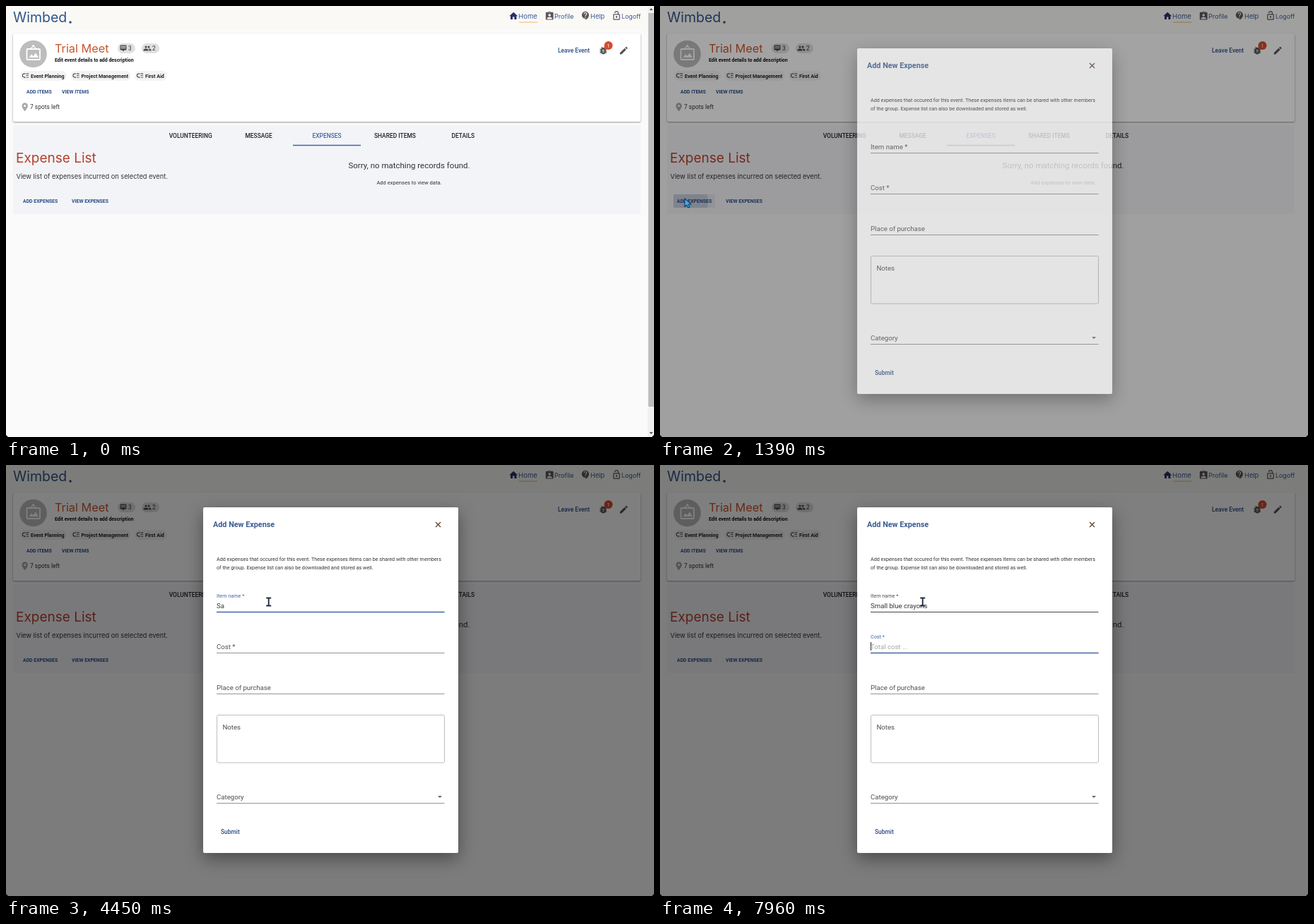
These frames come from a looping animation (917x611 px, 8000 ms). An HTML page:

```html
<!DOCTYPE html>
<html lang="en">
<head>
<meta charset="utf-8">
<title>Expense form</title>
<style>
  html, body { margin: 0; width: 100%; height: 100%; overflow: hidden; background: #fafafa; }
  svg { display: block; width: 917px; height: 611px; font-family: Roboto, Arial, sans-serif; }
  .geo { font-family: Inter, sans-serif; }
</style>
</head>
<body>
<svg id="stage" viewBox="0 0 917 611"></svg>
<script>
const LOOP = 8000;
const NAVY = '#2b4c86', BLUE = '#4464a6', INK = '#333', RED = '#b5402c';

// Markup helpers
const text = (x, y, size, str, fill = INK, weight = 400, extra = '') =>
  `<text x="${x}" y="${y}" font-size="${size}" fill="${fill}" font-weight="${weight}" ${extra}>${str}</text>`;
const geo = (x, y, size, str, fill) => text(x, y, size, str, fill, 400, 'class="geo"');
const mid = (x, y, size, str, fill, weight) => text(x, y, size, str, fill, weight, 'text-anchor="middle"');
const rect = (x, y, w, h, fill, r = 0, extra = '') =>
  `<rect x="${x}" y="${y}" width="${w}" height="${h}" rx="${r}" fill="${fill}" ${extra}/>`;
const icon = (name, x, y, scale, fill) =>
  `<path transform="translate(${x} ${y}) scale(${scale})" fill="${fill}" fill-rule="evenodd" d="${icons[name]}"/>`;
const line = (x1, x2, y, stroke, width = 1, extra = '') =>
  `<path d="M${x1} ${y}H${x2}" stroke="${stroke}" stroke-width="${width}" ${extra}/>`;

const icons = {
  home: 'M10 20v-6h4v6h5v-8h3L12 3 2 12h3v8z',
  profile: 'M19 3h-4.2a3 3 0 0 0-5.6 0H5a2 2 0 0 0-2 2v14a2 2 0 0 0 2 2h14a2 2 0 0 0 2-2V5a2 2 0 0 0-2-2zm-7 0a1 1 0 0 1 0 2 1 1 0 0 1 0-2zm0 4a3 3 0 0 1 0 6 3 3 0 0 1 0-6zm6 12H6v-1.4c0-2 4-3.1 6-3.1s6 1.1 6 3.1z',
  help: 'M11.5 2a8.5 8.5 0 0 0 0 17h.5v3c4.9-2.3 8-7 8-11.5A8.5 8.5 0 0 0 11.5 2zm1 14.5h-2v-2h2zm0-3.5h-2c0-3.2 3-3 3-5a2 2 0 0 0-4 0h-2a4 4 0 0 1 8 0c0 2.5-3 2.8-3 5z',
  lock: 'M12 17a2 2 0 0 0 0-4 2 2 0 0 0 0 4zm6-9h-1V6A5 5 0 0 0 7 6h1.9a3.1 3.1 0 0 1 6.2 0v2H6a2 2 0 0 0-2 2v10a2 2 0 0 0 2 2h12a2 2 0 0 0 2-2V10a2 2 0 0 0-2-2zm0 12H6V10h12z',
  edit: 'M3 17.2V21h3.8L17.8 9.9l-3.7-3.7zM20.7 7a1 1 0 0 0 0-1.4l-2.3-2.3a1 1 0 0 0-1.4 0l-1.9 1.8 3.8 3.8z',
  bug: 'M20 8h-2.8a6 6 0 0 0-1.8-2L17 4.4 15.6 3l-2.2 2.2a6 6 0 0 0-2.8 0L8.4 3 7 4.4 8.6 6a6 6 0 0 0-1.8 2H4v2h2.1L6 11v1H4v2h2v1l.1 1H4v2h2.8a6 6 0 0 0 10.4 0H20v-2h-2.1l.1-1v-1h2v-2h-2v-1l-.1-1H20zm-6 8h-4v-2h4zm0-4h-4v-2h4z',
  people: 'M16 11a3 3 0 0 0 0-6 3 3 0 0 0 0 6zm-8 0a3 3 0 0 0 0-6 3 3 0 0 0 0 6zm0 2c-2.3 0-7 1.2-7 3.5V19h14v-2.5C15 14.2 10.300 13 8 13zm8 0h-1c1.200.8 2 2 2 3.500V19h6v-2.500C23 14.200 18.300 13 16 13z',
  board: 'M5 3h14a2 2 0 0 1 2 2v10a2 2 0 0 1-2 2h-4l-3 4-3-4H5a2 2 0 0 1-2-2V5a2 2 0 0 1 2-2zm0 3v2h14V6zm0 4v2h14v-2z',
  list: 'M14 5h8v2h-8zm0 5.500h8v2h-8zm0 5.500h8v2h-8zM2 11.500A6.500 6.500 0 0 0 8.500 18H9v2l3-3-3-3v2h-.5a4.500 4.500 0 0 1 0-9H12V5H8.500A6.500 6.500 0 0 0 2 11.500z',
  pin: 'M12 2a7 7 0 0 0-7 7c0 5.200 7 13 7 13s7-7.800 7-13a7 7 0 0 0-7-7zm0 9.500a2.500 2.500 0 0 1 0-5 2.500 2.500 0 0 1 0 5z'
};

const chip = (x, w, label) =>
  rect(x, 92, w, 14, '#f3f3f4', 7) + icon('list', x + 2, 93.3, .46, '#333') +
  text(x + 15, 102, 7.1, label, '#222', 700);
const pill = (x, name, n) =>
  rect(x, 53, 25, 14, '#e0e0e0', 7) + icon(name, x + 2, 54, .5, '#4a4a4a') + text(x + 15, 63, 8.4, n);
const nav = (x, size, label, name, ix, iy, fill) =>
  icon(name, ix, iy, .6, fill) + geo(x, 18, size, label, '#3b5a94');

const header =
  rect(0, 0, 917, 611, '#fafafa') + rect(0, 0, 917, 34, '#faf9f6') +
  geo(10, 23, 19.5, 'Wimbed', '#2f5488') + '<circle cx="91" cy="23" r="1.800" fill="#2f5488"/>' +
  nav(725, 9.6, 'Home', 'home', 711, 7, '#28306c') + line(726, 752, 23, '#f0b860') +
  nav(776, 9.1, 'Profile', 'profile', 762, 7, '#5d5558') +
  nav(827, 9.3, 'Help', 'help', 813, 6.500, '#5d5558') +
  nav(871, 8.9, 'Logoff', 'lock', 856.800, 6.500, '#5d5558');

const card =
  rect(10, 39, 888, 125, '#fff', 2, 'style="filter:drop-shadow(0 1px 1px #0006)"') +
  '<circle cx="38.500" cy="68" r="19.300" fill="#bdbdbd"/>' +
  '<g fill="none" stroke="#fff" stroke-width="1.800"><rect x="29.500" y="61" width="18.500" height="15" rx="1"/>' +
  '<path d="M34 61l4.700-4 4.700 4" stroke-width="1.200"/></g>' +
  '<circle cx="38.700" cy="56.500" r="1.500" fill="#fff"/><path d="M32.500 73l3.500-4.500 2.500 2.500 3.500-4.500 4 6.500z" fill="#fff"/>' +
  geo(69, 66, 16.300, 'Trial Meet', '#c8552f') + pill(158, 'board', 3) + pill(192, 'people', 2) +
  chip(20, 66, 'Event Planning') + chip(91.500, 85, 'Project Management') + chip(182, 46, 'First Aid') +
  text(29, 124, 6.900, 'ADD ITEMS', NAVY, 700) + text(79, 124, 6.900, 'VIEW ITEMS', NAVY, 700) +
  icon('pin', 19.500, 136, .6, '#a9a9a9') + text(34, 145.500, 8.430, '7 spots left');

const loaded =
  text(69, 79, 6.950, 'Edit event details to add description', '#111', 700) +
  text(781, 66, 8.430, 'Leave Event', NAVY, 500) +
  icon('bug', 838, 56, .6, '#555') + '<circle cx="852.500" cy="56" r="6" fill="#d8492c"/>' +
  mid(852.500, 58.600, 7.200, '1', '#fff') + icon('edit', 867, 56, .6, '#555');

const tabs = ['VOLUNTEERING', 'MESSAGE', 'EXPENSES', 'SHARED ITEMS', 'DETAILS']
  .map((s, i) => mid(261.200 + i * 96.400, 187, 8.430, s, i == 2 ? BLUE : '#222', 500)).join('');

const panel =
  rect(10, 169, 888, 126, '#f3f4f7') + tabs + line(406, 502, 197.500, BLUE, 1.300) +
  geo(14, 222, 19, 'Expense List', RED) +
  geo(14.500, 245, 9.250, 'View list of expenses incurred on selected event.', '#333') +
  mid(570.500, 229.500, 11.500, 'Sorry, no matching records found.') +
  mid(570.500, 253, 7.600, 'Add expenses to view data.') +
  rect(19, 267, 59, 19, '#28467f', 2, 'id="hover"') +
  '<clipPath id="button"><rect x="19" y="267" width="59" height="19" rx="2"/></clipPath>' +
  '<circle id="ripple" cx="36" cy="277" fill="#28467f" clip-path="url(#button)"/>' +
  text(24, 279, 6.900, 'ADD EXPENSES', NAVY, 700) + text(93, 279, 6.900, 'VIEW EXPENSES', NAVY, 700);

const scrollbar =
  rect(908, 0, 9, 611, '#f1f1f1') + rect(909, 10, 8, 558, '#bdbdbd') +
  '<path d="M910.500 6l2.500-3 2.500 3zM910.500 604l2.500 3 2.500-3z" fill="#555"/>';

// An input whose label shrinks upward while a blue line grows from the middle
const field = (id, y, label, hint) =>
  line(298, 620.500, y + 5.500, '#949494', 1, `id="${id}Base"`) +
  line(298, 620.500, y + 5.500, BLUE, 1.300, `id="${id}Line"`) +
  `<g id="${id}Label">${text(0, 0, 9.650, label, 'inherit')}</g>` +
  text(298, y, 9.650, hint, '#a6a6a6', 400, `id="${id}Hint"`);

const dialog =
  rect(279, 60, 361, 490, '#fff', 2, 'style="filter:drop-shadow(0 8px 12px #0006)"') +
  text(293, 88, 10.800, 'Add New Expense', '#3a5c94', 700) +
  '<path d="M608 81l7 7m0-7l-7 7" stroke="#5a4234" stroke-width="1.300"/>' +
  text(298, 136, 7.200, 'Add expenses that occured for this event. These expenses items can be shared with other members') +
  text(298, 148, 7.200, 'of the group. Expense list can also be downloaded and stored as well.') +
  field('item', 203, 'Item name *', 'Name of expense ...') + field('cost', 261, 'Cost *', 'Total cost ...') +
  text(298, 203, 9.650, '', '#333', 400, 'id="typed"') +
  text(298, 319, 9.650, 'Place of purchase', '#4d4d4d') + line(298, 620.500, 324.500, '#949494') +
  rect(298.500, 354.500, 322, 67.500, 'none', 2, 'stroke="#bdbdbd"') + text(306.500, 374.500, 9.650, 'Notes', '#4d4d4d') +
  text(298, 473.500, 9.650, 'Category', '#4d4d4d') + line(298, 620.500, 479.500, '#949494') +
  '<path d="M611 469h6l-3 3z" fill="#666"/>' + text(304, 523, 8.430, 'Submit', NAVY, 500) +
  rect(0, 0, 1, 12, '#222', 0, 'id="caret"');

const pointers =
  '<path id="arrow" d="M0 0V11.500L2.800 9.200 4.800 13 7 12 5.200 8.300 9 7.800z" fill="#3db2ee" stroke="#173a63" stroke-width="1.100"/>' +
  '<path id="beam" d="M-3.500-5.500h7M-3.500 5.500h7M0-5.500v11" stroke="#1f2f42" stroke-width="1.900"/>';

const stage = document.getElementById('stage');
stage.innerHTML = header + card + `<g id="loaded">${loaded}</g>` + rect(69, 77, 139, 11, '#dcdcdc', 0, 'id="skeleton"') +
  panel + `<g id="scrollbar">${scrollbar}</g>` + rect(0, 0, 917, 611, '#000', 0, 'id="shade"') +
  `<g id="dialog">${dialog}</g>` + pointers + '<path d="M0 608v3h3zM917 608v3h-3z" fill="#000"/>';

const el = {};
stage.querySelectorAll('[id]').forEach(n => el[n.id] = n);
const set = (id, attrs) => { for (const k in attrs) el[id].setAttribute(k, attrs[k]); };
const show = (id, on) => set(id, { opacity: +on });

// Latest value whose time has come
const held = (t, steps, start) => steps.reduce((v, s) => t >= s[0] ? s[1] : v, start);

const fade = [[1330, .05], [1390, .72], [1460, .95], [1530, 1]];
const ripple = [[1200, 5], [1270, 11], [1330, 17], [1390, 32], [1460, 38], [1530, 46]];
const itemFocus = [[2380, .5], [2450, .9], [2510, 1]];
const costFocus = [[7760, .25], [7830, .7], [7890, .93], [7960, 1]];
const typing = [
  [3200, 'S'], [3460, 'Sam'], [3660, 'Saml'], [3860, 'Samll'], [4190, 'Saml'], [4320, 'Sam'], [4450, 'Sa'], [4650, 'S'],
  ...[4920, 5020, 5110, 5250, 5380, 5580, 5680, 5780, 5920, 5980, 6180, 6710, 6840, 7230, 7310, 7400, 7490]
    .map((t, i) => [t, 'Small blue crayons'.slice(0, i + 2)])
];
const path = [[130, 836, 596], [845, 35, 273], [1560, 35, 273], [1910, 385, 508], [2060, 385, 508], [2380, 374, 180], [2510, 371.700, 194]];

function pointerAt(t) {
  t = 130 + Math.floor((t - 130) / 65) * 65;
  const i = path.findIndex(p => p[0] > t);
  if (i < 0) return path[path.length - 1].slice(1);
  if (!i) return path[0].slice(1);
  const [a, b] = [path[i - 1], path[i]];
  const u = (t - a[0]) / (b[0] - a[0]), k = u * u * (3 - 2 * u);
  return [a[1] + (b[1] - a[1]) * k, a[2] + (b[2] - a[2]) * k];
}

function drawField(id, y, raised, focus, empty) {
  set(id + 'Label', {
    transform: `translate(298 ${y - 15.500 * raised}) scale(${1 - .25 * raised})`,
    fill: focus > 0 ? BLUE : '#4d4d4d'
  });
  el[id + 'Label'].firstChild.setAttribute('fill', focus > 0 ? BLUE : '#4d4d4d');
  const half = 161.250 * focus;
  set(id + 'Line', { d: `M${459.250 - half} ${y + 5.500}H${459.250 + half}`, opacity: +(focus > 0) });
  set(id + 'Hint', { opacity: empty && raised > .8 ? raised : 0 });
}

function draw(t) {
  const p = held(t, fade, 0);
  set('shade', { opacity: p / 2 });
  show('dialog', 0);
  set('dialog', { opacity: p });
  show('scrollbar', t < 1270);
  const loading = t >= 1270 && t < 1390;
  show('loaded', !loading);
  show('skeleton', loading);

  const out = Math.max(0, Math.min(1, (1800 - t) / 200));
  set('hover', { opacity: t < 845 ? 0 : t < 1130 ? .04 : .08 * out });
  set('ripple', { r: held(t, ripple, 0), opacity: .16 * out });

  const typed = held(t, typing, '');
  const item = held(t, itemFocus, 0), cost = held(t, costFocus, 0);
  drawField('item', 203, item, cost ? 0 : item, !typed);
  drawField('cost', 261, cost, cost, true);
  set('itemBase', { stroke: cost ? '#444' : '#949494' });
  el.typed.textContent = typed.replace(/ /g, '\xa0');

  const caretOn = t >= 2510 && !(t >= 2850 && t < 3200) && !(t >= 4190 && t < 4920);
  show('caret', caretOn);
  const end = typed && !cost ? el.typed.getComputedTextLength() : 0;
  set('caret', { x: Math.floor(298 + end), y: cost ? 251 : 193 });

  const [x, y] = pointerAt(t), beam = t >= 2320;
  set('arrow', { transform: `translate(${x} ${y})`, opacity: +(t >= 130 && !beam) });
  set('beam', { transform: `translate(${x} ${y})`, opacity: +beam });
}

const start = performance.now();
function tick() {
  draw((performance.now() - start) % LOOP);
  requestAnimationFrame(tick);
}
tick();
</script>
</body>
</html>
```
